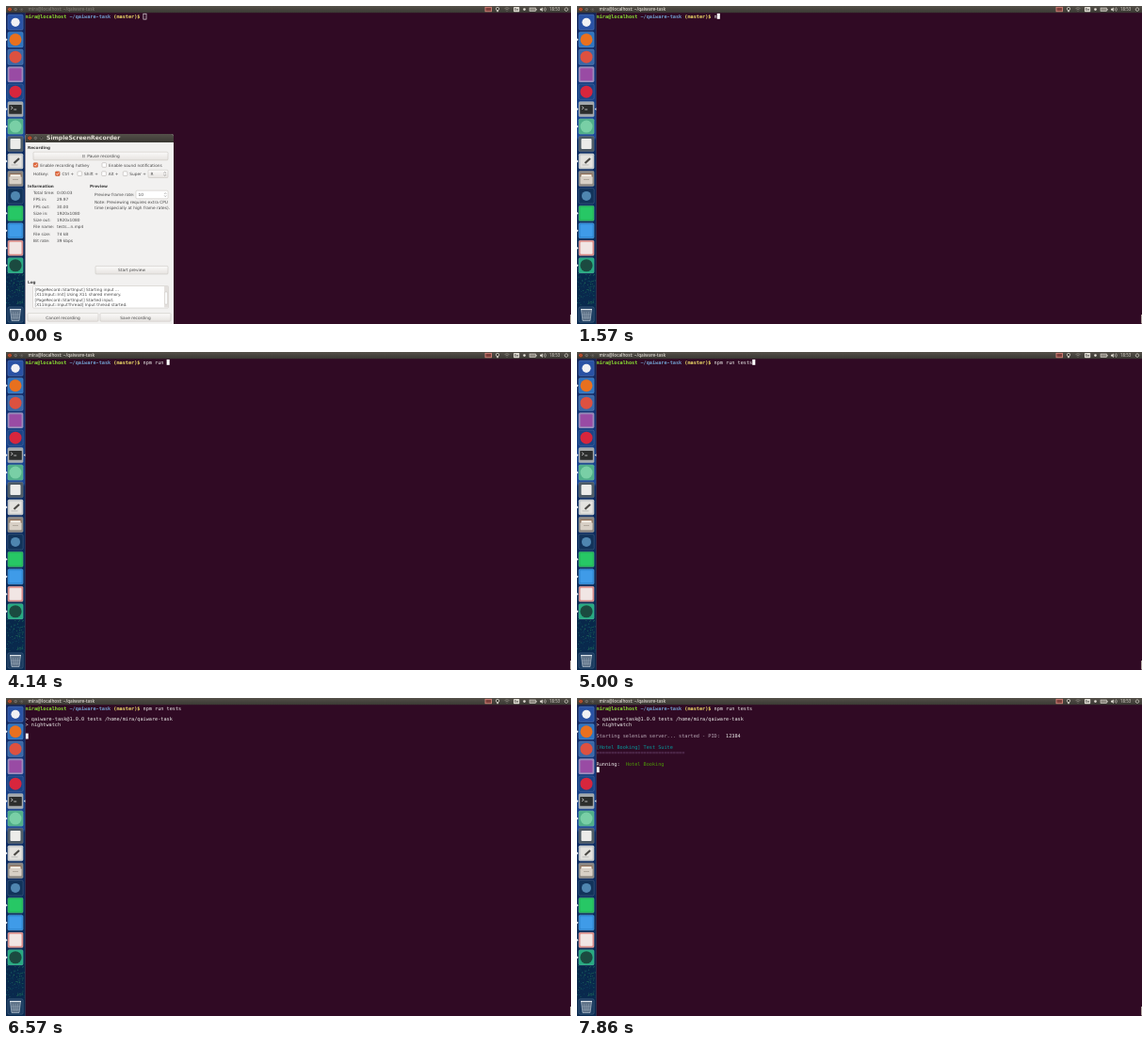
An HTML page for the animation above (8000 ms loop, 600 px wide and 338 px high).

```html
<!DOCTYPE html>
<html lang="en">
<head>
<meta charset="utf-8">
<title>Terminal test run</title>
<style>
  html, body { margin: 0; width: 100%; height: 100%; overflow: hidden; background: #300a24; }
  svg { display: block; width: 100%; height: 100%; }
  text { white-space: pre; }
  .term { font: 5.19px "DejaVu Sans Mono", monospace; fill: #eeeeec; }
  .bold { font-weight: 700; }
  .panel { font: 600 4.65px "Open Sans", sans-serif; fill: #dfdbd2; }
  .ui { font: 4.3px "DejaVu Sans", sans-serif; fill: #4a4a4a; }
  .ui.bold { font-weight: 700; font-size: 4.2px; fill: #3c3c3c; }
  .mid { text-anchor: middle; }
</style>
</head>
<body>
<svg viewBox="0 0 600 338" preserveAspectRatio="none">
  <defs>
    <linearGradient id="bar" x2="0" y2="1">
      <stop stop-color="#545049"/><stop offset="1" stop-color="#3a3833"/>
    </linearGradient>
    <linearGradient id="dockFill" x2="0" y2="1">
      <stop stop-color="#12245a"/><stop offset=".25" stop-color="#123a80"/>
      <stop offset=".4" stop-color="#1d4a98"/><stop offset=".41" stop-color="#0b2a62"/>
      <stop offset=".75" stop-color="#0c2c5a"/><stop offset=".85" stop-color="#08284a"/>
      <stop offset="1" stop-color="#0a2a50"/>
    </linearGradient>
    <linearGradient id="button" x2="0" y2="1">
      <stop stop-color="#fbfaf9"/><stop offset="1" stop-color="#e6e3e0"/>
    </linearGradient>
  </defs>
  <rect width="600" height="338" fill="#300a24"/>
  <g id="screen"></g>
  <rect id="cursor" width="3.1" height="5.9"/>
  <rect x="599" y="328" width="1" height="9.5" fill="#b5aaa4"/>
  <g id="dock"></g>
  <g id="top"></g>
  <g id="recorder"></g>
</svg>
<script>
const LOOP = 8000, BLINK = 560, CELL = 3.125, ROW = 5.94, LEFT = 20.6;
const $ = id => document.getElementById(id);

function add(parent, tag, attrs, content) {
  const el = document.createElementNS('http://www.w3.org/2000/svg', tag);
  for (const key in attrs) el.setAttribute(key, attrs[key]);
  if (content !== undefined) el.textContent = content;
  parent.appendChild(el);
  return el;
}
const rect = (p, x, y, width, height, fill, more) => add(p, 'rect', { x, y, width, height, fill, ...more });
const dot = (p, cx, cy, r, fill, more) => add(p, 'circle', { cx, cy, r, fill, ...more });
const path = (p, d, stroke, more) => add(p, 'path', { d, stroke, fill: 'none', 'stroke-width': .7, ...more });
const label = (p, x, y, content, cls, more) => add(p, 'text', { x, y, class: cls, ...more }, content);

// Terminal
const screen = $('screen');
const cell = (p, row, col, content, fill, bold) =>
  label(p, LEFT + col * CELL, 12.6 + row * ROW, content, bold ? 'term bold' : 'term', fill && { style: 'fill:' + fill });

cell(screen, 0, 0, 'mira@localhost', '#8ae234', true);
cell(screen, 0, 15, '~/qaiware-task', '#729fcf', true);
cell(screen, 0, 30, '(master)$', '#f3e06a', true);
const command = cell(screen, 0, 40, '');

const typed = [[1430, 'n'], [1860, 'np'], [2140, 'npm'], [2430, 'npm '], [3430, 'npm r'],
  [3710, 'npm ru'], [3860, 'npm run'], [4000, 'npm run '], [4290, 'npm run t'],
  [4430, 'npm run te'], [4570, 'npm run tes'], [4710, 'npm run tests']];

// time, cursor row, cursor column, then the printed pieces
const printed = [
  [5570, 1, 0, []],
  [6430, 5, 0, [[2, 0, '> qaiware-task@1.0.0 tests /home/mira/qaiware-task'], [3, 0, '> nightwatch']]],
  [7140, 5, 28, [[5, 0, 'Starting selenium server... ', '#b9a9b6']]],
  [7570, 6, 0, [[5, 28, 'started - PID: ', '#b9a9b6'], [5, 44, '12384']]],
  [7710, 9, 0, [[7, 0, '[Hotel Booking] Test Suite', '#06989a'], [8, 0, '='.repeat(30), '#75507b']]],
  [7860, 11, 0, [[10, 0, 'Running:'], [10, 10, 'Hotel Booking', '#4e9a06']]]
].map(([time, row, col, pieces]) => {
  const group = add(screen, 'g', {});
  pieces.forEach(piece => cell(group, ...piece));
  return { time, row, col, group };
});

// Launcher
const dock = $('dock');
rect(dock, 0, 7, 20.5, 331, 'url(#dockFill)');
let seed = 7;
const random = () => (seed = seed * 16807 % 2147483647) / 2147483647;
for (let i = 0; i < 110; i++) {
  rect(dock, random() * 19, 284 + random() * 34, .8, .8, i % 2 ? '#155a6a' : '#2f9460', { opacity: .7 });
}
rect(dock, 20, 7, .6, 331, '#3f3a58');

const round = (color, r = 6) => y => dot(dock, 10, y, r, color);
const square = (color, s = 13) => y => rect(dock, 10 - s / 2, y - s / 2, s, s, color, { rx: 1 });
function terminalIcon(y) {
  rect(dock, 3.2, y - 4.6, 13.6, 9.8, '#2b2d2c', { rx: .6 });
  path(dock, `M5.2 ${y - 2.8}l2 1.5-2 1.5M8.2 ${y + .4}h3`, '#f2f2f2');
}
function editorIcon(y) {
  square('#e4e3df')(y);
  path(dock, `M8.5 ${y + 2}L14 ${y - 3}`, '#4a4844', { 'stroke-width': 2.2 });
  path(dock, `M5.5 ${y + 4}h7`, '#aaa');
}
function folderIcon(y) {
  rect(dock, 3.5, y - 5.5, 13, 4, '#8f6d55', { rx: .8 });
  rect(dock, 4.5, y - 4.3, 11, 2.6, '#f4f0e8');
  rect(dock, 3.5, y - 2.2, 13, 8, '#d8d0c6', { rx: 1 });
  path(dock, `M7 ${y + 1}h6`, '#a0968a');
}
const icons = [
  ['#2a52a4', round('#f1f1f4', 4.6)],
  ['#2f74c0', round('#e8701f', 6.5), 1],
  ['#3a68a8', round('#dd5140', 6.5)],
  ['#9a86b8', square('#994ba4')],
  ['#1c4486', round('#d7263d', 6.5)],
  ['#a4a9ac', terminalIcon, 1],
  ['#4fae88', round('#79cfa6', 6.5), 1],
  ['#4d5a64', square('#ececea', 11)],
  ['#c4c7c8', editorIcon, 1],
  ['#8d8882', folderIcon],
  ['#12335a', round('#4f86b0', 5)],
  ['#25b65a', square('#27c765'), 1],
  ['#2f87d2', square('#3f9be8'), 1],
  ['#d98a86', square('#f1e6e4'), 1],
  ['#27a980', round('#1b4a40', 6.6), 1]
];
icons.forEach(([tile, draw, running], i) => {
  const y = 17.3 + i * 18.46;
  rect(dock, 1.8, y - 8.2, 16.4, 16.4, tile, { rx: 1.5, stroke: '#c4d4e8', 'stroke-opacity': .35, 'stroke-width': .5 });
  draw(y);
  if (running) path(dock, `M0 ${y - 1.4}l1.6 1.4-1.6 1.4z`, 'none', { fill: '#eef1f5' });
});
const focusMark = path(dock, 'M20.4 108.200l-1.6 1.4 1.6 1.4z', 'none', { fill: '#eef1f5' });
rect(dock, 1.8, 319.8, 16.4, 16.4, '#1c3c60', { rx: 1.5, stroke: '#5f7a98', 'stroke-width': .4 });
path(dock, 'M4.5 322.500h11l-1.5 12h-8z', '#b4c2ce', { fill: '#5c7086' });
path(dock, 'M4 322.500h12', '#dde4ea', { 'stroke-width': 1.2 });
path(dock, 'M7.5 325l.7 8M10 325v8M12.500 325l-.7 8M5 328h10M5.500 331h9', '#a9b8c6', { 'stroke-width': .4 });

// Top panel
function windowButtons(p, x, y, step) {
  ['#e2562c', '#75716a', '#75716a'].forEach((color, i) => dot(p, x + i * step, y, 2.1, color, { stroke: '#2c2a27', 'stroke-width': .4 }));
  path(p, `M${x - .8} ${y - .8}l1.600 1.600m0-1.600l-1.600 1.600M${x + step - 1} ${y}h2`, '#33302c', { 'stroke-width': .5 });
  rect(p, x + 2 * step - .8, y - .8, 1.6, 1.6, 'none', { stroke: '#33302c', 'stroke-width': .5 });
}
const panel = $('top');
rect(panel, 0, 0, 600, 7.2, 'url(#bar)');
windowButtons(panel, 4, 3.6, 6.2);
const title = label(panel, 23.5, 5.2, 'mira@localhost: ~/qaiware-task', 'panel');
rect(panel, 509, 1.300, 6.5, 4.5, '#7d403c', { stroke: '#e08a80', 'stroke-width': .8 });
dot(panel, 522, 3, 1.7, 'none', { stroke: '#dfdbd2', 'stroke-width': .7 });
rect(panel, 521.2, 4.6, 1.6, 1.6, '#dfdbd2');
path(panel, 'M529.500 2.600q2.500-2 5 0M530.500 3.900q1.500-1.300 3 0M531.500 5.200h1', '#908b82');
rect(panel, 539, 1, 6.2, 5.2, '#dfdbd2', { rx: .7 });
label(panel, 542.1, 5, 'En', 'panel mid', { style: 'fill:#3c3b37;font-size:3.7px' });
dot(panel, 550.5, 3.6, 1.3, '#dfdbd2');
rect(panel, 556, 2, 6.5, 3.4, '#8d8980', { stroke: '#dfdbd2', 'stroke-width': .6 });
rect(panel, 562.8, 3, .8, 1.5, '#dfdbd2');
path(panel, 'M567 2.800h1.200l1.600-1.400v4.600l-1.600-1.400h-1.200z', 'none', { fill: '#dfdbd2' });
path(panel, 'M571 2.300q1 1.300 0 2.600M572.500 1.400q1.700 2.200 0 4.400', '#dfdbd2', { 'stroke-width': .6 });
label(panel, 577, 5.2, '18:53', 'panel', { style: 'font-weight:400;font-size:4.4px' });
dot(panel, 595, 3.6, 1.7, 'none', { stroke: '#dfdbd2', 'stroke-width': 1, 'stroke-dasharray': '.9 .25' });

// Recorder window
const win = $('recorder');
path(win, 'M20.500 338V138.500q0-2.500 2.500-2.500h152.500q2.500 0 2.500 2.500V338z', 'none', { fill: '#f2f1f0' });
path(win, 'M20.500 145v-6.500q0-2.500 2.500-2.500h152.500q2.500 0 2.500 2.500v6.500z', 'none', { fill: 'url(#bar)' });
windowButtons(win, 25.2, 140.3, 6.2);
label(win, 43, 142.3, 'SimpleScreenRecorder', 'ui bold', { style: 'fill:#e5e1d8;font-size:6.1px' });

const heading = (x, y, s) => label(win, x, y, s, 'ui bold');
const text = (x, y, s) => label(win, x, y, s, 'ui');
const field = (x, y, w, h, fill = '#fff') => rect(win, x, y, w, h, fill, { rx: 1, stroke: '#c3beb8', 'stroke-width': .5 });
function button(x, y, w, s, shift = 0) {
  field(x, y, w, 8.6, 'url(#button)');
  label(win, x + w / 2 + shift, y + 5.9, s, 'ui mid');
}
function check(x, y, s, on) {
  rect(win, x, y - 4.3, 4.6, 4.6, on ? '#e5673a' : '#fff', { rx: .8, stroke: on ? '#b64c27' : '#aaa5a0', 'stroke-width': .5 });
  if (on) path(win, `M${x + 1} ${y - 2}l1.100 1.200 1.700-2.600`, '#fff');
  text(x + 7, y, s);
}
heading(23, 152.4, 'Recording');
button(29, 155.2, 143, 'Pause recording', 3);
path(win, 'M81.700 158v3.200M83.200 158v3.200', '#777');
check(29.2, 171, 'Enable recording hotkey', true);
check(102, 171, 'Enable sound notifications');
text(29, 180.2, 'Hotkey:');
check(52.5, 180.2, 'Ctrl +', true);
check(76, 180.2, 'Shift +');
check(101.700, 180.2, 'Alt +');
check(124.300, 180.2, 'Super +');
field(151, 174.3, 21, 8.2, 'url(#button)');
text(153.5, 180, 'R');
path(win, 'M167.500 177.700l1.200-1.200 1.200 1.200M167.500 179.200l1.200 1.200 1.200-1.200', '#555', { 'stroke-width': .5 });

heading(23, 193, 'Information');
[['Total time:', '0:00:03'], ['FPS in:', '29.97'], ['FPS out:', '30.00'], ['Size in:', '1920x1080'],
 ['Size out:', '1920x1080'], ['File name:', 'tests...n.mp4'], ['File size:', '74 kB'], ['Bit rate:', '39 kbps']]
  .forEach(([name, value], i) => {
    text(29, 200.2 + i * 7.22, name);
    text(54, 200.2 + i * 7.22, value);
  });
heading(89, 193, 'Preview');
text(94, 202, 'Preview frame rate:');
field(138, 196.2, 34, 8.6);
text(140.5, 202, '10');
path(win, 'M168.200 199.700l1-1 1 1M168.200 201.500l1 1 1-1', '#555', { 'stroke-width': .5 });
text(94, 210.4, 'Note: Previewing requires extra CPU');
text(94, 215.8, 'time (especially at high frame rates).');
button(95, 276.4, 77, 'Start preview');

heading(23, 295, 'Log');
field(28.5, 297.5, 144, 23.5);
['[PageRecord::StartInput] Starting input ...', '[X11Input::Init] Using X11 shared memory.',
 '[PageRecord::StartInput] Started input.', '[X11Input::InputThread] Input thread started.']
  .forEach((s, i) => text(30.5, 302.6 + i * 5.45, s));
rect(win, 168, 298, 4, 22.5, '#e3e0dd');
rect(win, 168.4, 304, 3.2, 13, '#fafafa', { rx: 1, stroke: '#bcb7b1', 'stroke-width': .4 });
button(23, 326.6, 75, 'Cancel recording');
button(100, 326.6, 75, 'Save recording');

// Playback
const cursor = $('cursor');
const begin = performance.now();

function draw(t) {
  const focused = t >= 140;
  win.style.display = t < 290 ? '' : 'none';
  win.style.opacity = focused ? .4 : 1;
  title.style.opacity = focused ? 1 : .35;
  focusMark.style.display = focused ? '' : 'none';

  let since = 290, entry = '', row = 0, col = 40;
  for (const [time, s] of typed) {
    if (t >= time) { since = time; entry = s; col = 40 + s.length; }
  }
  for (const out of printed) {
    const shown = t >= out.time;
    out.group.style.display = shown ? '' : 'none';
    if (shown) { since = out.time; row = out.row; col = out.col; }
  }
  if (command.textContent !== entry) command.textContent = entry;

  const inset = focused ? 0 : .3;
  cursor.setAttribute('x', LEFT + col * CELL + inset);
  cursor.setAttribute('y', 7.9 + row * ROW + inset);
  cursor.setAttribute('fill', focused ? '#fff' : 'none');
  cursor.setAttribute('stroke', focused ? 'none' : '#fff');
  cursor.setAttribute('stroke-width', .6);
  const lit = t < since || Math.floor((t - since) / BLINK) % 2 === 0;
  cursor.style.display = lit ? '' : 'none';
}

function tick() {
  draw((performance.now() - begin) % LOOP);
  requestAnimationFrame(tick);
}
tick();
</script>
</body>
</html>
```
